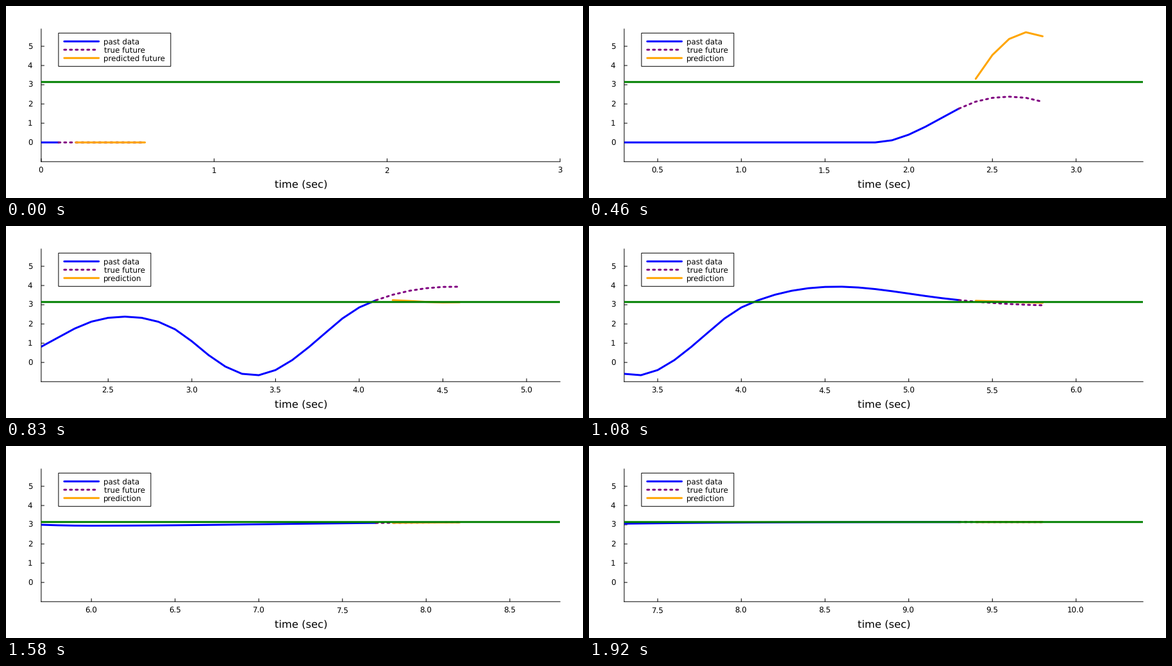
These frames come from a looping animation (900 by 300 pixels, 1.96 s). A matplotlib script:

```python
import numpy as np
import matplotlib.pyplot as plt
from matplotlib.animation import FuncAnimation
from matplotlib.patches import Rectangle

W, H, DPI = 900, 300, 100
LOOP, TICK = 1960, 10      # ms
FPS = 24
PT = 72 / DPI              # points per pixel
LEFT, TOP, WIDE, TALL = 54.9, 35.9, 809.3, 207.3
BASE = TOP + TALL
Y_MIN, Y_MAX = -1, 5.9

plt.rcParams.update({"font.family": "DejaVu Sans", "font.size": 8.6,
                     "text.hinting": "none"})

# Pendulum swing as (time, angle, slope) keys.
KEYS = [(1.8, 0, 0), (2.3, 1.76, 4.5), (2.6, 2.38, 0), (3.0, 1.10, -7.5),
        (3.37, -0.68, 0), (3.8, 1.55, 7.5), (4.0, 2.86, 4.2), (4.57, 3.94, 0),
        (5.2, 3.34, -1.05), (6.0, 2.95, 0)]


def pendulum(t):
    """Rest, swing along the keys, then settle at pi."""
    if t <= KEYS[0][0]:
        return 0.0
    for (t0, a0, m0), (t1, a1, m1) in zip(KEYS, KEYS[1:]):
        if t <= t1:
            h = t1 - t0
            u = (t - t0) / h
            return (a0 + (a1 - a0) * u * u * (3 - 2 * u)
                    + h * u * (1 - u) * (m0 * (1 - u) - m1 * u))
    return np.pi - 0.19 * np.exp(-((t - 6) / 1.45) ** 2)


time = np.arange(100) / 10
angle = np.array([pendulum(t) for t in time])


def forecast(step, now):
    """True path plus a model error that fades as the model learns."""
    if now < 18:
        return np.zeros(5)
    miss = np.interp(step, [8, 10, 15, 20, 26, 38], [0, 3.8, 2.1, -0.82, 0.13, 0])
    return angle[now + 1:now + 6] + miss * np.sin(0.35 * np.arange(1, 6))


fig = plt.figure(figsize=(W / DPI, H / DPI), dpi=DPI, facecolor="white")
ax = fig.add_axes([LEFT / W, 1 - BASE / H, WIDE / W, TALL / H], ylim=(Y_MIN, Y_MAX))
ax.set(xticks=[], yticks=[])
for side, spine in ax.spines.items():
    spine.set(linewidth=PT, snap=False, zorder=1, visible=side in ("left", "bottom"))

# Overlay measured in pixels from the top left, for legend and labels.
over = fig.add_axes([0, 0, 1, 1], xlim=(0, W), ylim=(H, 0), zorder=2)
over.axis("off")

SOLID, DOTS = "-", (0, (1, 2))
STYLES = [("blue", SOLID), ("purple", DOTS), ("orange", SOLID)]


def stroke(axes, xs, ys, color, style=SOLID, z=3):
    line, = axes.plot(xs, ys, color=color, ls=style, lw=3 * PT, zorder=z,
                      solid_capstyle="round", dash_capstyle="round",
                      solid_joinstyle="round", dash_joinstyle="round", snap=False)
    return line


def tick_marks():
    line, = ax.plot([], [], color="black", lw=PT, zorder=1, snap=False, clip_on=False,
                    solid_capstyle="butt", transform=over.transData)
    return line


def segments(a, b):
    """Interleave ends with gaps so one line draws many ticks."""
    return np.column_stack([a, b, np.full(len(a), np.nan)]).ravel()


def write(x, y, text="", **kw):
    return over.text(x, y, text, va="baseline", **kw)


levels = np.arange(6)
rows = BASE - TALL * (levels - Y_MIN) / (Y_MAX - Y_MIN)
edge = np.full(6, LEFT)
tick_marks().set_data(segments(edge, edge + 5), segments(rows, rows))
for level, row in zip(levels, rows):
    write(41.4, row + 4.3, str(level), ha="right")
x_marks = tick_marks()
x_labels = [write(0, 261.3, ha="center") for _ in range(7)]
write(460, 284, "time (sec)", ha="center", fontsize=11.8)

past, future, guess = [stroke(ax, [], [], c, s, 3 + i / 10)
                       for i, (c, s) in enumerate(STYLES)]
stroke(ax, [-1, 12], [np.pi, np.pi], "green", z=4)

box = over.add_patch(Rectangle((81.9, 42.3), 175, 52, fc="white", ec="black",
                               lw=PT, snap=False))
names = []
for i, (color, style) in enumerate(STYLES):
    y = 55.3 + 13 * i
    stroke(over, [90.8, 144.7], [y, y], color, style)
    names.append(write(152.4, y + 4.5))
names[0].set_text("past data")
names[1].set(text="true future", x=153.3)


def set_window(lo, hi):
    """Limits in tenths of a second; whole seconds if four of them fit."""
    ticks, form = [t for t in range(lo, hi + 1) if t % 10 == 0], "{:.0f}"
    if len(ticks) < 4:
        ticks, form = [t for t in range(lo, hi + 1) if t % 5 == 0], "{:.1f}"
    ax.set_xlim(lo / 10, hi / 10)
    xs = LEFT + WIDE * (np.array(ticks) - lo) / (hi - lo)
    x_marks.set_data(segments(xs, xs), segments(0 * xs + BASE, 0 * xs + BASE - 5))
    for i, label in enumerate(x_labels):
        shown = i < len(ticks)
        label.set_visible(shown)
        if shown:
            label.set(x=xs[i] - 0.6, text=form.format(ticks[i] / 10))


def update(i):
    step = int((i * TICK + 4) * FPS / 1000)
    now = 1 + 2 * step
    early = now <= 20
    set_window(*((0, 30) if early else (now - 20, now + 11)))
    past.set_data(time[:now + 1], angle[:now + 1])
    future.set_data(time[now:now + 6], angle[now:now + 6])
    guess.set_data(time[now + 1:now + 6], forecast(step, now))
    box.set_width(175 if early else 144)
    names[2].set_text("predicted future" if early else "prediction")
    return past, future, guess


anim = FuncAnimation(fig, update, frames=LOOP // TICK, interval=TICK,
                     repeat=True, repeat_delay=0, blit=False)
plt.show()
```
